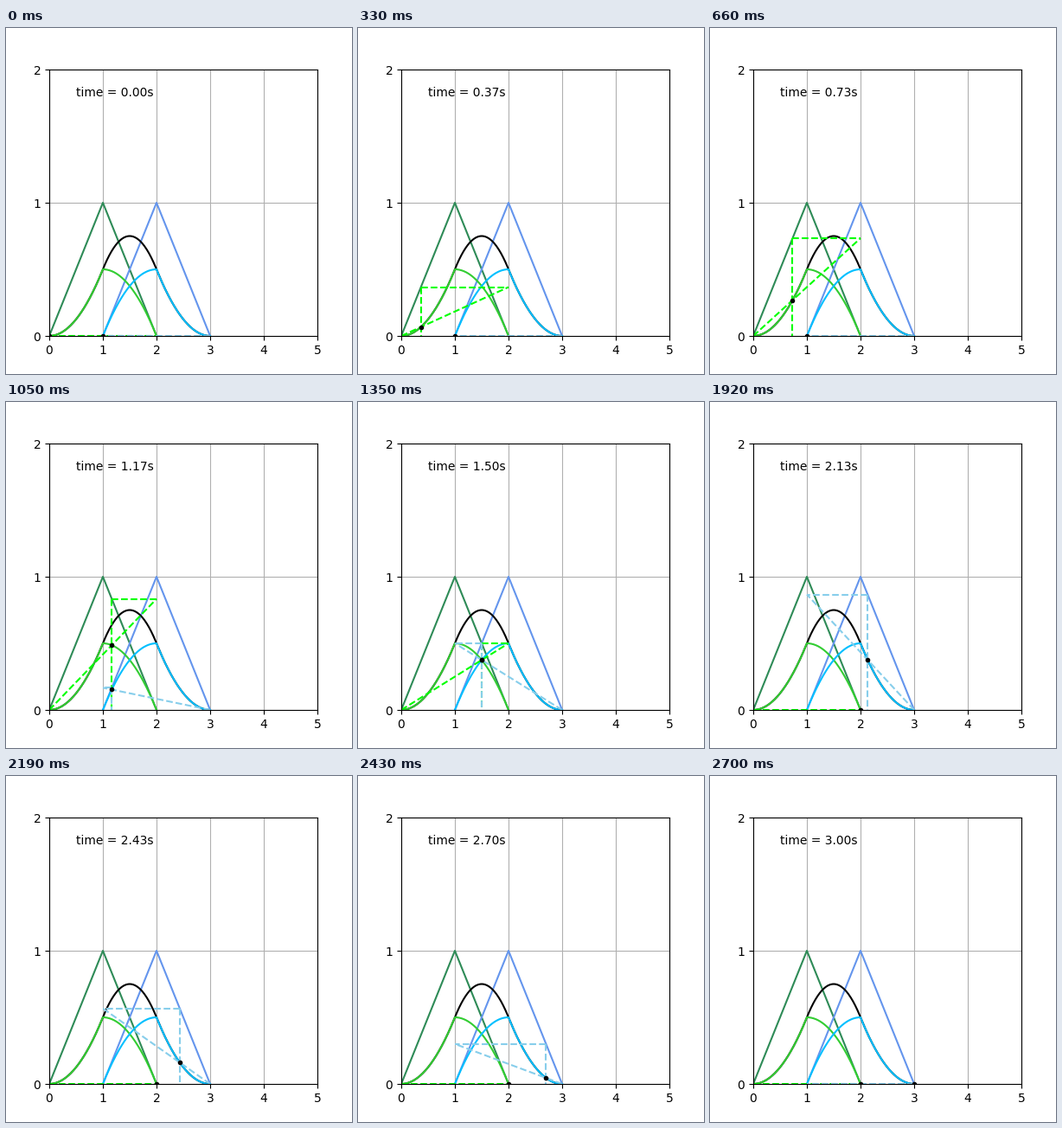
Write a matplotlib script that moves like this. It is 400x400 px and loops after 2.73 s.

```python
import matplotlib.pyplot as plt
import numpy as np
from matplotlib.animation import FuncAnimation

FPS = 30
FRAMES = 91


def hat(t, start):
    """Linear B-spline on [start, start + 2]."""
    return np.maximum(0, 1 - np.abs(t - start - 1))


def rising(t):
    return t / 2 * hat(t, 0)


def falling(t):
    return (3 - t) / 2 * hat(t, 1)


fig, ax = plt.subplots(figsize=(4, 4), dpi=100)
ax.set(xlim=(0, 5), ylim=(0, 2), xticks=range(6), yticks=range(3))
ax.grid(True)

ax.plot([0, 1, 2], [0, 1, 0], color="seagreen")
ax.plot([1, 2, 3], [0, 1, 0], color="cornflowerblue")
x = np.linspace(0, 3, 301)
ax.plot(x, rising(x) + falling(x), color="black")
x = np.linspace(0, 2, 201)
ax.plot(x, rising(x), color="limegreen")
ax.plot(x + 1, falling(x + 1), color="deepskyblue")


class Guide:
    """Dashed construction of one weighted hat, with its moving point."""

    def __init__(self, start, ramp_from, ramp_to, weighted, color):
        self.start, self.ramp_from, self.ramp_to = start, ramp_from, ramp_to
        self.weighted = weighted
        self.drop, self.level, self.ramp = (
            ax.plot([], [], "--", color=color)[0] for _ in range(3))
        self.dot, = ax.plot([], [], "o", color="black", ms=3, zorder=2.2)

    def move(self, time):
        t = np.clip(time, self.start, self.start + 2)
        h = hat(t, self.start)
        self.drop.set_data([t, t], [h, 0])
        self.level.set_data([t, self.ramp_to], [h, h])
        self.ramp.set_data([self.ramp_from, self.ramp_to], [0, h])
        self.dot.set_data([t], [self.weighted(t)])
        return [self.drop, self.level, self.ramp, self.dot]


guides = [Guide(0, 0, 2, rising, "lime"),
          Guide(1, 3, 1, falling, "skyblue")]
label = ax.text(0.1, 0.9, "", transform=ax.transAxes)


def update(i):
    time = i / FPS
    label.set_text(f"time = {time:.2f}s")
    return [label] + [a for g in guides for a in g.move(time)]


anim = FuncAnimation(fig, update, frames=FRAMES, interval=30,
                     repeat=True, repeat_delay=0)
plt.show()
```
